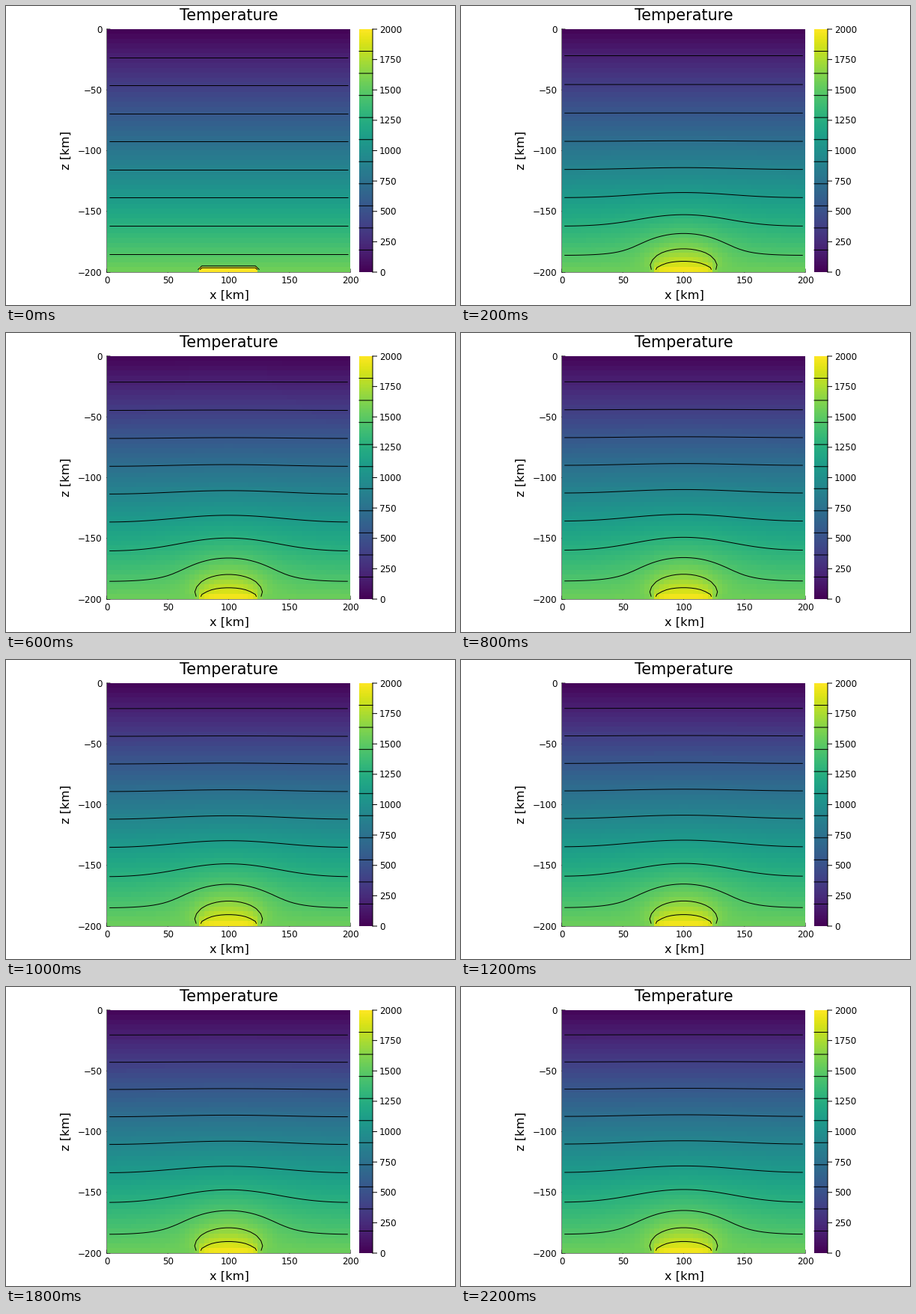
Write a matplotlib script that moves like this. It is 600 by 400 pixels and loops after 2270 ms.

```python
import numpy as np
import matplotlib.pyplot as plt
from matplotlib.animation import FuncAnimation

W, H, DPI = 600, 400, 100
PX = 72 / DPI                                   # points per pixel
LEFT, TOP, RIGHT, BOTTOM = 135, 31, 460, 356
BAR_LEFT, BAR_RIGHT = 472, 490
SIZE = 200.0                                    # km
T_BASE, T_PLUME, T_MAX = 1573.0, 2000.0, 2000.0
CELLS, STATES = 50, 34
FOURIER, SUBSTEPS = 0.225, 100
TICK_MS, LOOP_MS = 10, 2270

plt.rcParams["font.family"] = "DejaVu Sans"


def to_x(km):
    return LEFT + (RIGHT - LEFT) * km / SIZE


def to_y(depth):
    return TOP + (BOTTOM - TOP) * depth / SIZE


def bar_y(value):
    return BOTTOM - (BOTTOM - TOP) * value / T_MAX


def diffuse(centers):
    """Explicit heat diffusion: fixed top and bottom edges, insulated sides."""
    temp = np.repeat((T_BASE * centers / SIZE)[:, None], CELLS, axis=1)
    temp[-1, np.abs(centers - SIZE / 2) < 25] = T_PLUME
    top, bottom = temp[0].copy(), temp[-1].copy()
    states = [temp.copy()]
    for _ in range(STATES - 1):
        for _ in range(SUBSTEPS):
            g = np.pad(temp, 1, mode="edge")
            g[0, 1:-1] = 2 * top - temp[0]
            g[-1, 1:-1] = 2 * bottom - temp[-1]
            temp = temp + FOURIER * (g[:-2, 1:-1] + g[2:, 1:-1] + g[1:-1, :-2]
                                     + g[1:-1, 2:] - 4 * temp)
        states.append(temp)
    return states


fig = plt.figure(figsize=(W / DPI, H / DPI), dpi=DPI, facecolor="white")
ax = fig.add_axes([0, 0, 1, 1])
ax.set_xlim(0, W)
ax.set_ylim(H, 0)
ax.axis("off")
ax.autoscale(False)


def line(xs, ys, zorder=3):
    ax.plot(xs, ys, color="black", lw=PX, zorder=zorder, snap=False,
            solid_capstyle="projecting")


def label(x, y, text, px, ha="center", va="baseline", **kw):
    ax.text(x, y, text, fontsize=px * PX, ha=ha, va=va, **kw)


def picture(data, extent):
    return ax.imshow(data, cmap="viridis", vmin=0, vmax=T_MAX, extent=extent,
                     aspect="auto", interpolation="nearest", zorder=2)


# Axes lie under the heat map, so only their outer edge shows
line([LEFT, LEFT], [TOP, BOTTOM], 1)
line([LEFT, RIGHT], [BOTTOM, BOTTOM], 1)
for km in range(0, 201, 50):
    x, y = to_x(km), to_y(km)
    line([x, x], [BOTTOM, BOTTOM - 4], 1)
    line([LEFT, LEFT + 4], [y, y], 1)
    label(x, 371.4, str(km), 11.9)
    label(128.4, y + 4.6, f"\u2212{km}" if km else "0", 11.9, ha="right")

label(298.3, 19.1, "Temperature", 20.8)
label(298, 387.4, "x [km]", 16.3, va="center")
label(80.2, 193, "z [km]", 16.3, va="center", rotation=90)

levels = T_MAX * np.arange(1, 11) / 11
picture(np.linspace(T_MAX, 0, 256)[:, None], (BAR_LEFT, BAR_RIGHT, BOTTOM, TOP))
for level in levels:
    line([BAR_LEFT, BAR_RIGHT], [bar_y(level)] * 2)
line([BAR_RIGHT, BAR_RIGHT], [TOP, BOTTOM])
for value in range(0, 2001, 250):
    y = bar_y(value)
    line([BAR_RIGHT, BAR_RIGHT + 5.5], [y, y])
    label(498.8, y + 4.6, str(value), 11.9, ha="left")

centers = (np.arange(CELLS) + 0.5) * SIZE / CELLS
states = diffuse(centers)
heat = picture(states[0], (LEFT, RIGHT, BOTTOM, TOP))
contours = [ax.contour(to_x(centers), to_y(centers), temp, levels=levels,
                       colors="black", linewidths=PX, zorder=4)
            for temp in states]
ax.set_xlim(0, W)
ax.set_ylim(H, 0)


def update(tick):
    # 15 states per second on a 10 ms clock
    current = int((tick + 0.5) * TICK_MS * 15 / 1000)
    heat.set_data(states[current])
    for i, contour in enumerate(contours):
        contour.set_visible(i == current)
    return [heat, *contours]


anim = FuncAnimation(fig, update, frames=LOOP_MS // TICK_MS, interval=TICK_MS,
                     repeat=True, repeat_delay=0, blit=False)
plt.show()
```
